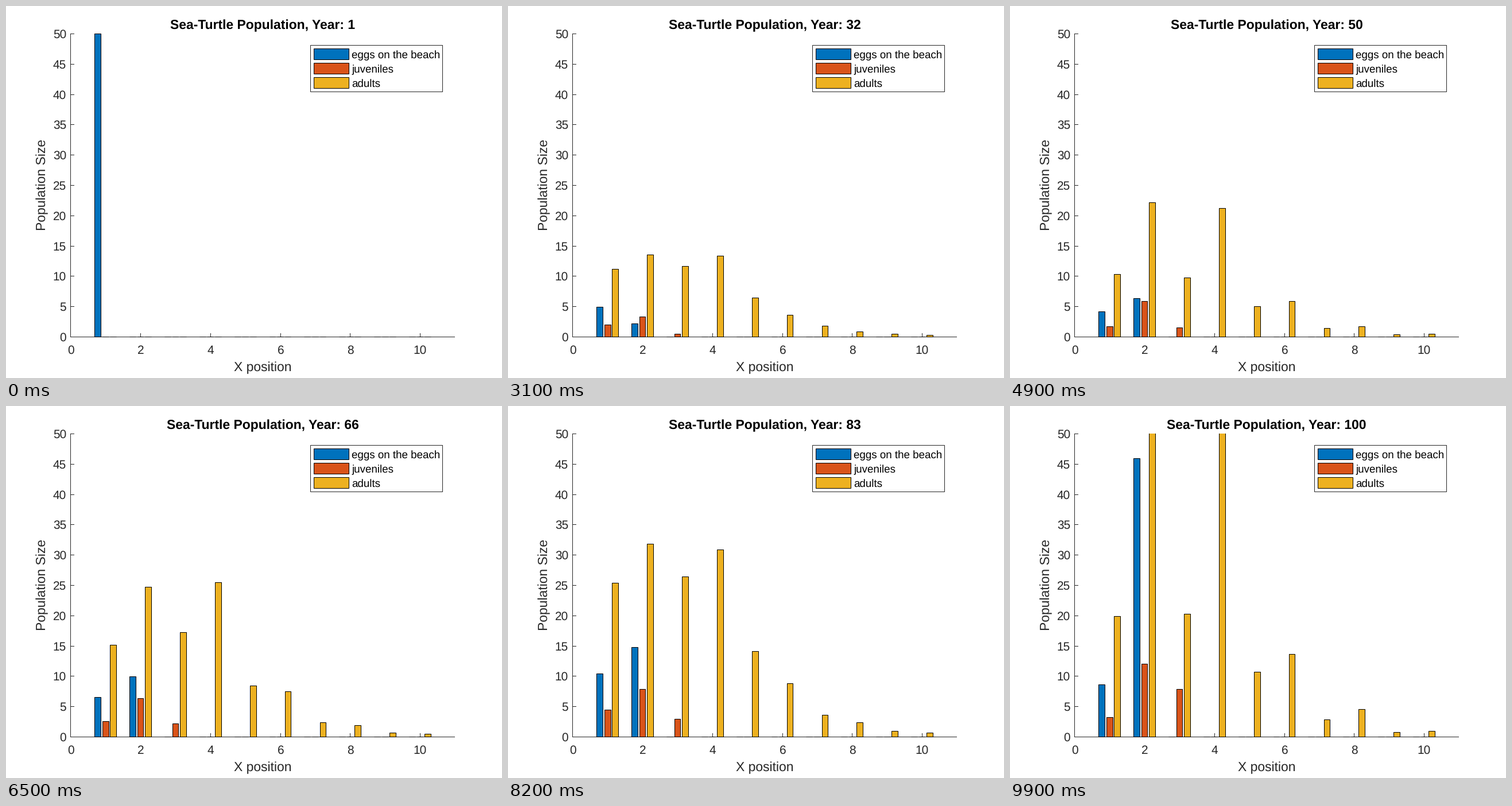
Animation of 864x648 px, one loop 10 s. Source, as a matplotlib script:

```python
import matplotlib.pyplot as plt
import numpy as np
from matplotlib.animation import FuncAnimation
from matplotlib.patches import Rectangle

W, H, YEARS, SITES = 864, 648, 100, 10
X0, X_UNIT, Y0, Y_UNIT = 112.32, 60.87, 576, 10.56
RIGHT, TOP = 782, 48
TICK, LABEL, LEGEND = 20.83, 22.9, 18.75
DARK = "#262626"
STAGES = [("eggs on the beach", "#0072BD"),
          ("juveniles", "#D95319"),
          ("adults", "#EDB120")]

plt.rcParams.update({"font.family": "Liberation Sans",
                     "text.hinting": "none",
                     "path.snap": False})


def simulate():
    """Population by year, stage and site."""
    year = np.arange(1, YEARS + 1)[:, None]
    site = np.arange(1, SITES + 1)

    # Adults grow steadily, thin out beyond site 4 and spread outwards;
    # even and odd sites swing apart in a slow cycle.
    growth = 7.04 * np.exp(.01686 * year)
    range_limit = .52 ** np.maximum(site - 4, 0)
    arrival = np.clip((year - 2.2 * site) / 8, 0, 1)
    swing = .25 + .2 * np.cos(2 * np.pi * (year - 19) / 27)
    adults = growth * range_limit * arrival * (1 + swing * (-1.0) ** site)

    eggs, juveniles = np.zeros((2, YEARS, SITES))
    eggs[:, 0] = .4 * adults[:, 0]
    eggs[:, 1] = adults[:, 1] ** 2 / 70
    juveniles[:, 0] = .17 * adults[:, 0]
    juveniles[:, 1] = .25 * adults[:, 1]
    juveniles[:, 2] = .2 * eggs[:, 1]

    # The first clutch hatches and matures
    eggs[0, 0] = 50
    juveniles[1:, 0] += 25 * .5 ** np.arange(YEARS - 1)

    population = np.stack([eggs, juveniles, adults], axis=1)
    noise = np.random.default_rng(7).normal(size=population.shape)
    noise[0] = 0
    return population * np.exp(.06 * noise)


def px(x):
    return round(X0 + x * X_UNIT) + .5


def py(y):
    return round(Y0 - y * Y_UNIT) + .5


fig = plt.figure(figsize=(W / 72, H / 72), dpi=72, facecolor="white")
ax = fig.add_axes([0, 0, 1, 1])
ax.set(xlim=(0, W), ylim=(H, 0))
ax.axis("off")


def line(x1, y1, x2, y2):
    ax.plot([x1, x2], [y1, y2], color=DARK, lw=1, solid_capstyle="projecting",
            zorder=1)


def text(x, y, s, size, ha="center", color=DARK, **kw):
    return ax.text(x, y, s, size=size, ha=ha, va="baseline", color=color,
                   zorder=6, **kw)


def box(x, y, w, h, face, edge="black", z=2):
    return ax.add_patch(Rectangle((x, y), w, h, fc=face, ec=edge, lw=1, zorder=z))


# Axes
line(px(0), py(0), RIGHT - .5, py(0))
line(px(0), py(0), px(0), py(50))
for v in range(0, 51, 5):
    line(px(0), py(v), px(0) + 6, py(v))
    text(105, py(v) + 7.7, str(v), TICK, ha="right")
for v in range(0, 11, 2):
    line(px(v), py(0), px(v), py(0) - 6)
    text(px(v), 606, str(v), TICK)
text(447, 636.5, "X position", LABEL)
text(69, 312, "Population Size", LABEL, rotation=90, rotation_mode="anchor")
title = text(447, 40, "", LABEL, color="black", weight="bold")

# Legend
box(530.5, 68.5, 230, 81, "white", DARK, 4)
for i, (name, color) in enumerate(STAGES):
    y = 74.5 + 25 * i
    box(536.5, y, 61, 19, color, z=5)
    text(602, y + 16.5, name, LEGEND, ha="left", color="black")

# Bars
plot_area = Rectangle((112, TOP), RIGHT - 112, Y0 + 1 - TOP, transform=ax.transData)
bars = []
for k, (_, color) in enumerate(STAGES):
    for site in range(1, SITES + 1):
        mid = site + (k - 1) * 2 / 9
        left, right = px(mid - 4 / 45), px(mid + 4 / 45)
        bar = box(left, py(0), right - left, 0, color)
        bar.set_clip_path(plot_area)
        bars.append(bar)

population = simulate()


def update(i):
    title.set_text(f"Sea-Turtle Population, Year: {i + 1}")
    for bar, value in zip(bars, population[i].ravel()):
        bar.set_y(py(value))
        bar.set_height(py(0) - py(value))
    return [title, *bars]


anim = FuncAnimation(fig, update, frames=YEARS, interval=100, repeat=True,
                     repeat_delay=0)
plt.show()
```
